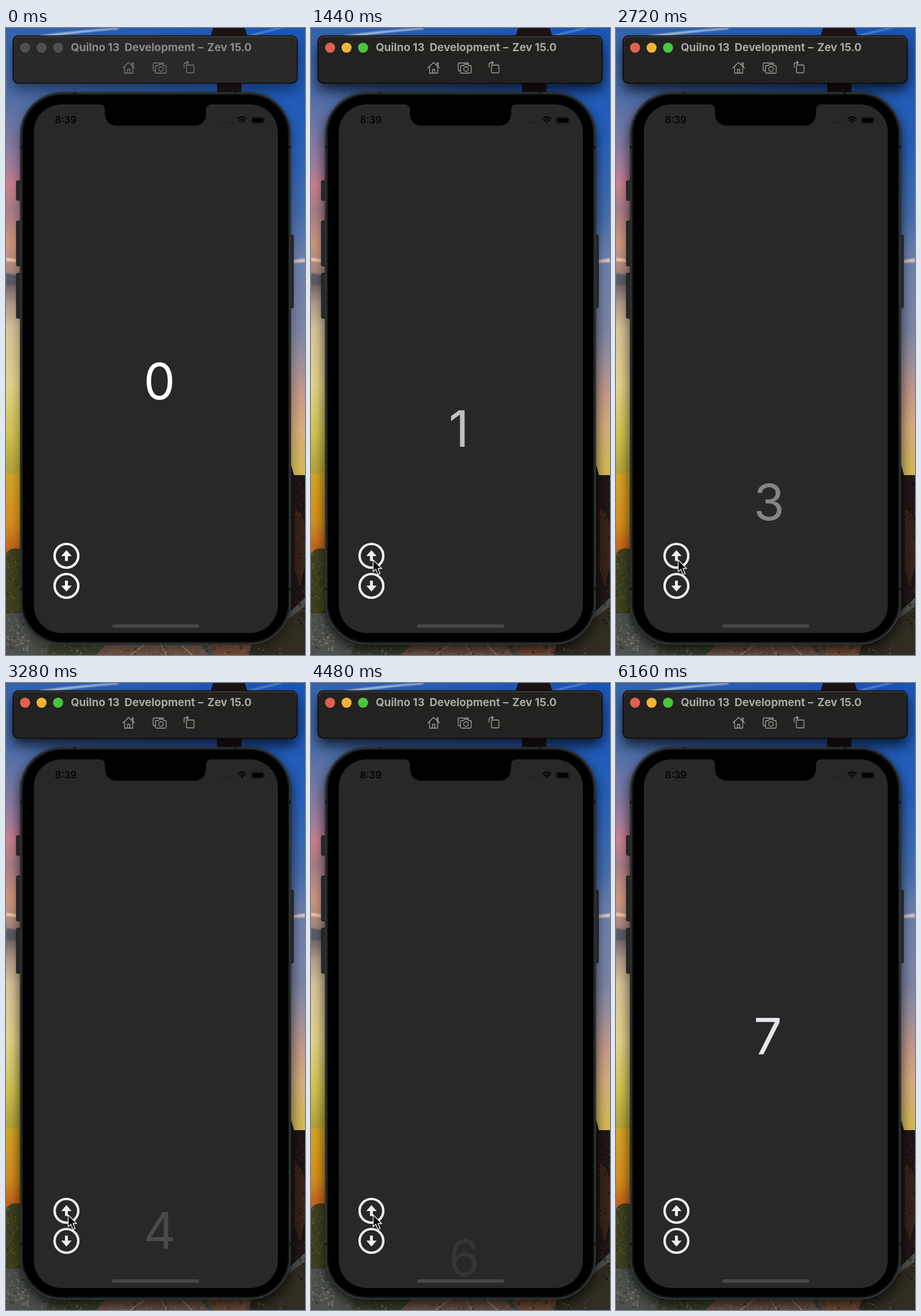
An HTML page that plays this animation: 517x1084 px, repeating every 6240 ms.

```html
<!DOCTYPE html>
<html lang="en">
<head>
<meta charset="utf-8">
<title>Counter</title>
<style>
  html, body { margin: 0; width: 100%; height: 100%; overflow: hidden; background: #282828; }
  svg { display: block; width: 517px; height: 1084px; }
  text { font-family: Inter, Roboto, sans-serif; }
  .bar { fill: #2b2928; }
  .light { fill: #504f4e; }
  .title { fill: #8d8b89; font-size: 18.8px; font-weight: 700; }
  .icon { fill: none; stroke: #7d7b79; stroke-width: 1.3; stroke-linejoin: round; stroke-linecap: round; }
  .btn { color: #fff; }
  .shade { opacity: .42; }
  .active .shade { opacity: .72; }
  .active .bar { fill: #232220; }
  .active .title { fill: #a9a8a4; }
  .active .icon { stroke: #a6a4a1; }
  .active .red { fill: #e0604f; }
  .active .amber { fill: #efb43a; }
  .active .green { fill: #49c63f; }
  .active .btn { color: #efeff1; }
</style>
</head>
<body>
<svg id="stage" viewBox="0 0 517 1084">
  <defs>
    <linearGradient id="west" x1="0" y1="0" x2="0" y2="1">
      <stop offset="0" stop-color="#3566ae"/>
      <stop offset=".1" stop-color="#4a6ca6"/>
      <stop offset=".17" stop-color="#7a7ba6"/>
      <stop offset=".22" stop-color="#a77f9d"/>
      <stop offset=".25" stop-color="#d07f8e"/>
      <stop offset=".29" stop-color="#ac7f86"/>
      <stop offset=".345" stop-color="#d2977c"/>
      <stop offset=".385" stop-color="#b08a80"/>
      <stop offset=".41" stop-color="#77686c"/>
      <stop offset=".44" stop-color="#b59c88"/>
      <stop offset=".48" stop-color="#dcc69a"/>
      <stop offset=".57" stop-color="#e6d68c"/>
      <stop offset=".65" stop-color="#d3c550"/>
      <stop offset=".708" stop-color="#b5a53a"/>
      <stop offset=".712" stop-color="#d8a626"/>
      <stop offset=".79" stop-color="#d98f1c"/>
      <stop offset=".835" stop-color="#c4601a"/>
    </linearGradient>
    <linearGradient id="east" x1="0" y1="0" x2="0" y2="1">
      <stop offset="0" stop-color="#1b55b6"/>
      <stop offset=".18" stop-color="#2660bb"/>
      <stop offset=".3" stop-color="#456fb0"/>
      <stop offset=".36" stop-color="#6a7fae"/>
      <stop offset=".48" stop-color="#7f86a8"/>
      <stop offset=".53" stop-color="#9c929e"/>
      <stop offset=".58" stop-color="#c69a8c"/>
      <stop offset=".64" stop-color="#d8b07c"/>
      <stop offset=".7" stop-color="#d6ba5a"/>
    </linearGradient>
    <linearGradient id="blend">
      <stop offset="0" stop-color="#000"/>
      <stop offset=".85" stop-color="#fff"/>
    </linearGradient>
    <mask id="fade"><rect width="517" height="1084" fill="url(#blend)"/></mask>
    <filter id="soft" filterUnits="userSpaceOnUse" x="-60" y="-60" width="640" height="1220"><feGaussianBlur stdDeviation="11"/></filter>
    <filter id="hazy" x="-20%" y="-50%" width="140%" height="200%"><feGaussianBlur stdDeviation="1.2"/></filter>
    <clipPath id="glass"><rect x="48" y="132" width="422" height="914" rx="48"/></clipPath>
    <g id="arrow">
      <circle r="20.5" fill="none" stroke="currentColor" stroke-width="4.2"/>
      <path d="M0-9.8 9 .6H2.5V9H-2.5V.6H-9Z" fill="currentColor"/>
    </g>
  </defs>

  <!-- backdrop -->
  <rect width="517" height="1084" fill="url(#west)"/>
  <rect width="517" height="1084" fill="url(#east)" mask="url(#fade)"/>
  <g filter="url(#hazy)">
    <path d="M55 13Q120 4 192 0L196 2Q130 7 70 16Z" fill="#a9bfe0"/>
    <path d="M418 12 470 0H480L428 13Z" fill="#5f8bd0"/>
    <path d="M0 397 25 401V405L0 403Z" fill="#f1c9a3"/>
    <path d="M0 424 25 428V444H0Z" fill="#5c5c69"/>
    <path d="M493 402 517 398V405L493 406Z" fill="#e3c0bd"/>
  </g>
  <path d="M358 0H413L417 13H354ZM365 90H407V113H365Z" fill="#1d1414"/>
  <path d="M490 745 498 773H517V1084H488Z" fill="#1d1615"/>
  <path d="M500 830Q517 840 517 870V930L508 965 499 935Z" fill="#38231b"/>
  <path d="M0 908Q12 895 26 902V1020H0Z" fill="#3f4120"/>
  <path d="M0 1012H30Q40 1050 80 1064H440L490 1010 517 985V1084H0Z" fill="#4d514c"/>
  <path d="M75 1064H175L160 1084H70Z" fill="#3b4630"/>
  <path d="M175 1064H335L350 1084H155Z" fill="#77594a"/>
  <path d="M350 1064H425V1084H360Z" fill="#7f523a"/>
  <path d="M425 1064 490 1020 517 1000V1084H420Z" fill="#302d22"/>
  <path d="M240 1066 215 1084M268 1066 278 1084M302 1066 322 1084" stroke="#b69b86" stroke-width="1.5"/>
  <g id="specks"></g>

  <!-- window shadows -->
  <g class="shade" filter="url(#soft)">
    <rect x="12" y="26" width="492" height="82" rx="12"/>
    <rect x="24" y="120" width="469" height="956" rx="73"/>
  </g>

  <!-- toolbar window -->
  <rect class="bar" x="12" y="13.5" width="491.5" height="82" rx="10" stroke="#0b0b0b" stroke-width="1.6"/>
  <path d="M14 23Q14 15 23 15H493Q502 15 502 23" fill="none" stroke="#5a5957" stroke-width=".9"/>
  <circle class="light red" cx="33" cy="34" r="8.7"/>
  <circle class="light amber" cx="61.5" cy="34" r="8.7"/>
  <circle class="light green" cx="90" cy="34" r="8.7"/>
  <g class="title">
    <text x="112" y="40">Quilno 13</text>
    <text x="205" y="40">Development</text>
    <text x="332" y="40">–</text>
    <text x="348" y="40">Zev 15.0</text>
  </g>
  <g class="icon">
    <path d="M202 69 212 59.5 222 69M205 67V78H219V67M218 64V60.5H220V66M210 78V71.5H214V78"/>
    <path d="M258 74H256Q254.5 74 254.5 72.5V62Q254.5 60.5 256 60.5H271Q272.5 60.5 272.5 62"/>
    <path d="M260 65H263.5L265 62.7H271L272.5 65H275.5Q277 65 277 66.5V76.5Q277 78 275.5 78H260Q258.5 78 258.5 76.5V66.5Q258.5 65 260 65Z"/>
    <circle cx="268" cy="71" r="4"/>
    <rect x="312" y="64" width="13" height="13.5" rx="1.5"/>
    <path d="M308 68V63Q308 60 311 60H315M312.5 57.5 315.5 60 312.5 62.5"/>
  </g>

  <!-- phone -->
  <g fill="#26292b" stroke="#111415" stroke-width="1">
    <rect x="18" y="264" width="9" height="34" rx="2"/>
    <rect x="18" y="333.5" width="9" height="78" rx="2"/>
    <rect x="18" y="424" width="9" height="78" rx="2"/>
    <rect x="490" y="358" width="7" height="126" rx="2"/>
  </g>
  <rect x="24" y="110.5" width="469" height="956" rx="73" fill="#181c1c"/>
  <rect x="25.8" y="112.3" width="465.4" height="952.4" rx="71" stroke="#3d4342" stroke-width="1.8"/>
  <rect x="28.2" y="114.7" width="460.6" height="947.6" rx="69" stroke="#1b1f1f" stroke-width="2"/>
  <path d="M119 111V116M396 111V116M24 206H29M488 206H493M24 970H29M488 970H493" stroke="#15191a" stroke-width="5"/>
  <rect x="48" y="132" width="422" height="914" rx="48" fill="#282828"/>
  <path d="M164 131V132.5Q171 133 171 141V146Q171 169 194 169H323Q346 169 346 146V141Q346 133 353 132.5V131Z"/>
  <text x="84.5" y="165.3" font-size="16.8" font-weight="600" fill="#050505">8:39</text>
  <g fill="#1a1a1a">
    <circle cx="376.5" cy="163.5" r="1.3"/><circle cx="381.5" cy="163.5" r="1.3"/>
    <circle cx="386.5" cy="163.5" r="1.3"/><circle cx="391.5" cy="163.5" r="1.3"/>
  </g>
  <path d="M400.3 157.5Q408 150.500 415.7 157.5M403 160.6Q408 156 413 160.6" fill="none" stroke="#050505" stroke-width="2.3"/>
  <path d="M405.3 162 408 164.8 410.7 162Q408 160 405.3 162Z" fill="#050505"/>
  <rect x="423.5" y="153.5" width="23.5" height="12" rx="3.5" fill="none" stroke="#191919"/>
  <rect x="425.3" y="155.3" width="19.9" height="8.4" rx="2" fill="#020202"/>
  <path d="M448.5 157.5Q450 159.5 448.5 161.5Z" fill="#191919"/>

  <g clip-path="url(#glass)"><text id="digit" x="238" y="642" font-size="86.5">0</text></g>
  <g class="btn">
    <use href="#arrow" x="104.5" y="912.5"/>
    <use href="#arrow" transform="translate(104.5 964.5) scale(1 -1)"/>
  </g>
  <rect x="183.5" y="1031" width="150.5" height="5.8" rx="2.9" fill="#474747"/>
  <path id="cursor" transform="translate(107.5 919.5)" d="M0 0V20.5L4.6 16.2 8.2 25.3 12 23.7 8.3 15H14.7Z"
    fill="#0b0b0b" stroke="#f4f4f4" stroke-width="1.3" stroke-linejoin="round"/>
</svg>
<script>
  const LOOP = 6240, STEP = 80, SLIDE = 600, DROP = 410, BASE = 642;
  const TAPS = [960, 1680, 2426, 3172, 3806, 4440, 5216];
  const FOCUS = 480, LEAVE = 5320;
  const get = id => document.getElementById(id);
  const stage = get('stage'), digit = get('digit'), cursor = get('cursor');

  // loose foliage, girders and rooftops: [x, y, width, height, count, colours]
  let seed = 7;
  const rand = () => (seed = seed * 16807 % 2147483647) / 2147483647;
  const patches = [
    [0, 908, 23, 100, 90, ['#66642a', '#2b3019', '#544e24']],
    [0, 1018, 40, 60, 80, ['#7d8580', '#2e3633', '#8b7d6d']],
    [496, 776, 20, 270, 110, ['#3a241c', '#0e0b0b', '#4a2b1e']],
    [60, 1066, 430, 16, 140, ['#2a3024', '#8a7a6c', '#8c6048']],
    [366, 97, 38, 12, 16, ['#3a2420', '#0d0b0d']]
  ];
  const speck = (x, y, w, h, colours) => {
    const [px, py, sw, sh] = [x + rand() * w, y + rand() * h, 1 + rand() * 4, 1 + rand() * 3].map(v => v.toFixed(1));
    const fill = colours[Math.floor(rand() * colours.length)];
    return `<rect x="${px}" y="${py}" width="${sw}" height="${sh}" fill="${fill}" opacity=".6"/>`;
  };
  get('specks').innerHTML = patches.map(([x, y, w, h, n, colours]) =>
    Array.from({ length: n }, () => speck(x, y, w, h, colours)).join('')).join('');

  // each tap replaces the digit, which rises and fades in from below
  function draw(now) {
    const t = Math.floor(now % LOOP / STEP) * STEP;
    const count = TAPS.filter(tap => tap <= t).length;
    const p = count ? Math.min(1, (t - TAPS[count - 1]) / SLIDE) : 1;
    digit.textContent = count;
    digit.setAttribute('y', BASE + DROP * (1 - p));
    digit.setAttribute('opacity', p);
    digit.setAttribute('fill', count ? '#e6e5ec' : '#fff');
    stage.classList.toggle('active', t >= FOCUS);
    cursor.style.display = t >= FOCUS && t < LEAVE ? '' : 'none';
  }

  const start = performance.now();
  function tick(now) {
    draw(Math.max(0, now - start));
    requestAnimationFrame(tick);
  }
  draw(0);
  requestAnimationFrame(tick);
</script>
</body>
</html>
```
